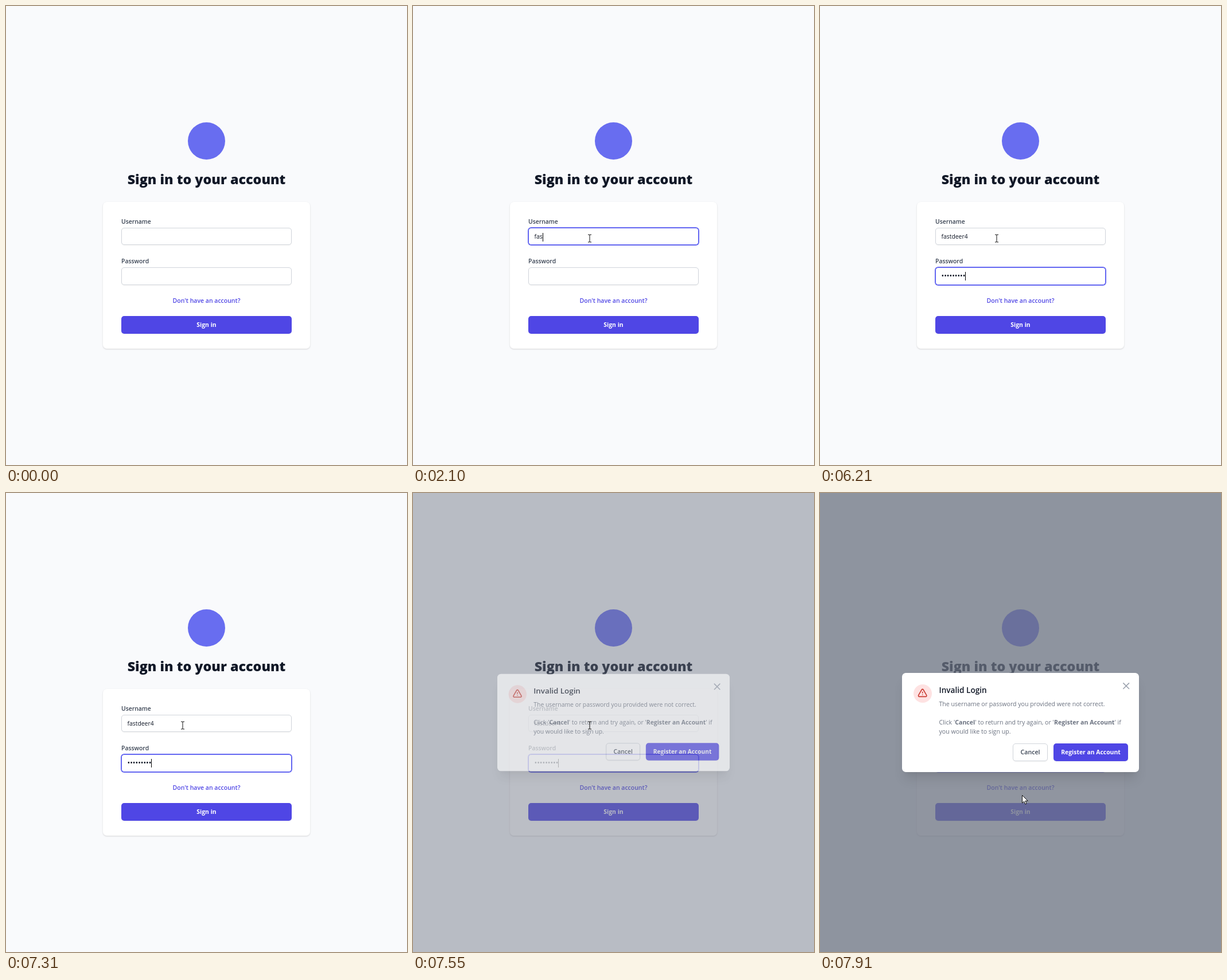
These frames come from a looping animation (699 by 801 pixels, 7990 ms). An HTML page:

```html
<!DOCTYPE html>
<html lang="en">
<head>
<meta charset="utf-8">
<title>Sign in</title>
<style>
html, body { margin: 0; width: 100%; height: 100%; overflow: hidden; }
body { background: #f9fafc; font: 10.6px/16px "Open Sans", "Noto Sans", sans-serif; color: #6b7280; }
#stage { position: relative; width: 699px; height: 801px; overflow: hidden; }
#stage div, #stage svg { position: absolute; box-sizing: border-box; white-space: nowrap; }
#stage .layer { inset: 0; }
.logo { left: 317px; top: 203px; width: 65px; height: 65px; border-radius: 50%; background: #686df0; }
h1 { position: absolute; margin: 0; left: 0; right: 0; top: 286px; text-align: center;
  font-size: 23.3px; line-height: 32px; font-weight: 800; color: #111827; }
.card { left: 169px; top: 342px; width: 361px; height: 256px; border-radius: 6.5px; background: #fff;
  box-shadow: 0 1px 3px rgba(0,0,0,.1), 0 1px 2px rgba(0,0,0,.06); }
.label { left: 201px; font-size: 10.4px; font-weight: 600; color: #374151; }
.input, .button { border-radius: 5px; line-height: 28px; border: 1px solid #d1d5db;
  box-shadow: 0 1px 2px rgba(0,0,0,.05); }
.input { left: 201px; width: 297px; padding-left: 9.5px; background: #fff; color: #111827; font-size: 10.4px; }
.input.focus { border-color: #6366f1; box-shadow: 0 0 0 1px #6366f1, 0 1px 2px rgba(0,0,0,.05); }
.input i { display: inline-block; width: 1px; height: 15px; margin-right: -1px; background: #000; vertical-align: middle; }
#username { top: 387px; height: 30px; }
#password { top: 456px; height: 31px; font-size: 12.4px; }
.link { left: 0; right: 0; top: 506px; text-align: center; font-size: 10.5px; font-weight: 600; color: #4f46e5; }
.button { height: 31px; text-align: center; font-weight: 600; color: #374151; background: #fff; }
.primary { border: 0; line-height: 31px; font-size: 10.4px; font-weight: 700; color: #fff; background: #4f46e5; }
.primary.hover { background: #4338ca; }
#submit { left: 201px; top: 541px; width: 297px; }
#shade { background: #6b7280; }
#modal { transform-origin: 349.5px 400.5px; }
.panel { left: 143px; top: 314px; width: 413px; height: 173px; border-radius: 6.5px; background: #fff;
  box-shadow: 0 16px 20px -4px rgba(0,0,0,.1), 0 8px 8px -4px rgba(0,0,0,.04); }
.badge { left: 162.5px; top: 333.5px; width: 32px; height: 32px; border-radius: 50%; background: #fee2e2; }
.icon { width: 19.4px; height: 19.4px; fill: none; stroke-width: 2; stroke-linecap: round; stroke-linejoin: round; }
.heading { left: 207.5px; top: 336px; font-size: 13.6px; font-weight: 600; color: #111827; }
.message { left: 207.5px; top: 360px; }
.message b { font-weight: 700; }
#cursor { left: 0; top: 0; width: 1px; height: 1px; overflow: visible; }
</style>
</head>
<body>
<div id="stage">
  <div class="logo"></div>
  <h1>Sign in to your account</h1>
  <div class="card"></div>
  <div class="label" style="top:368px">Username</div>
  <div class="input" id="username"><span></span><i></i></div>
  <div class="label" style="top:437px">Password</div>
  <div class="input" id="password"><span></span><i></i></div>
  <div class="link">Don't have an account?</div>
  <div class="button primary" id="submit">Sign in</div>

  <div class="layer" id="shade"></div>
  <div class="layer" id="modal">
    <div class="panel"></div>
    <div class="badge"></div>
    <svg class="icon" viewBox="0 0 24 24" stroke="#c93a30" style="left:168.8px;top:339.5px"><path d="M12 9v2m0 4h.01m-6.938 4h13.856c1.54 0 2.502-1.667 1.732-3L13.732 4c-.77-1.333-2.694-1.333-3.464 0L3.34 16c-.77 1.333.192 3 1.732 3z"/></svg>
    <svg class="icon" viewBox="0 0 24 24" stroke="#9ca3af" style="left:523.8px;top:327.3px"><path d="M6 18L18 6M6 6l12 12"/></svg>
    <div class="heading">Invalid Login</div>
    <div class="message">The username or password you provided were not correct.<br><br>Click '<b>Cancel</b>' to return and try again, or '<b>Register an Account</b>' if<br>you would like to sign up.</div>
    <div class="button" style="left:336px;top:437px;width:61px">Cancel</div>
    <div class="button primary" style="left:407px;top:437px;width:130px">Register an Account</div>
  </div>

  <svg id="cursor"><path stroke-linejoin="round"/></svg>
</div>
<script>
const $ = id => document.getElementById(id);
const LOOP = 7990;
const NAME = "fastdeer4";
const nameKeys = [1630, 1860, 2100, 2720, 2950, 3200, 3270, 3420, 3810];
const passKeys = [4740, 4820, 4970, 5130, 5510, 5680, 5830, 5900, 6210];
const dialogSteps = [7450, 7550, 7640, 7710, 7780, 7840, 7910];
const shapes = {
  arrow: "M0 0V13.5L3.2 10.6 5.4 15.6 7.6 14.6 5.4 9.8H9.8Z",
  beam: "M-3 -6.5H-1L0 -6 1 -6.5H3M0 -6V6M-3 6.5H-1L0 6 1 6.5H3",
  hand: "M-1.5 1Q0 -1 1.5 1V6L7 7.5Q9 8 8.5 10L7 16H0L-5 10Q-5 8 -3 8.5L-1.5 10Z"
};
const between = (t, a, b) => t >= a && t < b;
const countUpTo = (times, t) => times.filter(time => time <= t).length;

function setField(id, text, focused, caret) {
  const field = $(id);
  field.classList.toggle("focus", focused);
  field.firstChild.textContent = text;
  field.lastChild.style.visibility = caret ? "visible" : "hidden";
}

function pointerAt(t) {
  if (t < 300) return null;
  if (t >= 7640) {
    const p = (countUpTo(dialogSteps, t) - 3) / 4;
    return { x: 308 + 44.5 * p, y: 405.5 + 122 * p, shape: p ? "arrow" : "beam" };
  }
  const rest = 1 - Math.min(10, Math.floor((t - 300) / 79)) / 10;
  const x = 308 + 64 * rest ** 2, y = 405.5 + 388 * rest ** 2;
  const overInput = between(y, 387, 417) || between(y, 456, 487);
  const overButton = between(y, 541, 572);
  const shape = overInput ? "beam" : overButton || between(y, 507, 522) ? "hand" : "arrow";
  return { x, y, shape, overButton };
}

function drawPointer(pointer) {
  $("cursor").style.display = pointer ? "" : "none";
  $("submit").classList.toggle("hover", !!pointer?.overButton);
  if (!pointer) return;
  const path = $("cursor").firstChild, { x, y, shape } = pointer;
  path.setAttribute("d", shapes[shape]);
  path.setAttribute("transform", `translate(${x} ${y})`);
  path.setAttribute("fill", shape === "beam" ? "none" : "#fff");
  path.setAttribute("stroke", "#111");
}

function render(now) {
  const t = now % LOOP;
  const caretOn = !between(t, 2570, 2720) && !between(t, 6750, 7310);
  setField("username", NAME.slice(0, countUpTo(nameKeys, t)),
    between(t, 1240, 4360), between(t, 1320, 4360) && caretOn);
  setField("password", "•".repeat(countUpTo(passKeys, t)),
    t >= 4360, t >= 4430 && caretOn);

  const step = countUpTo(dialogSteps, t);
  const shown = step ? 1 - ((7910 - dialogSteps[step - 1]) / 628) ** 1.7 : 0;
  $("shade").style.opacity = .75 * shown;
  $("modal").style.opacity = shown;
  $("modal").style.transform = `scale(${.95 + .05 * shown})`;

  drawPointer(pointerAt(t));
  requestAnimationFrame(render);
}
requestAnimationFrame(render);
</script>
</body>
</html>
```
